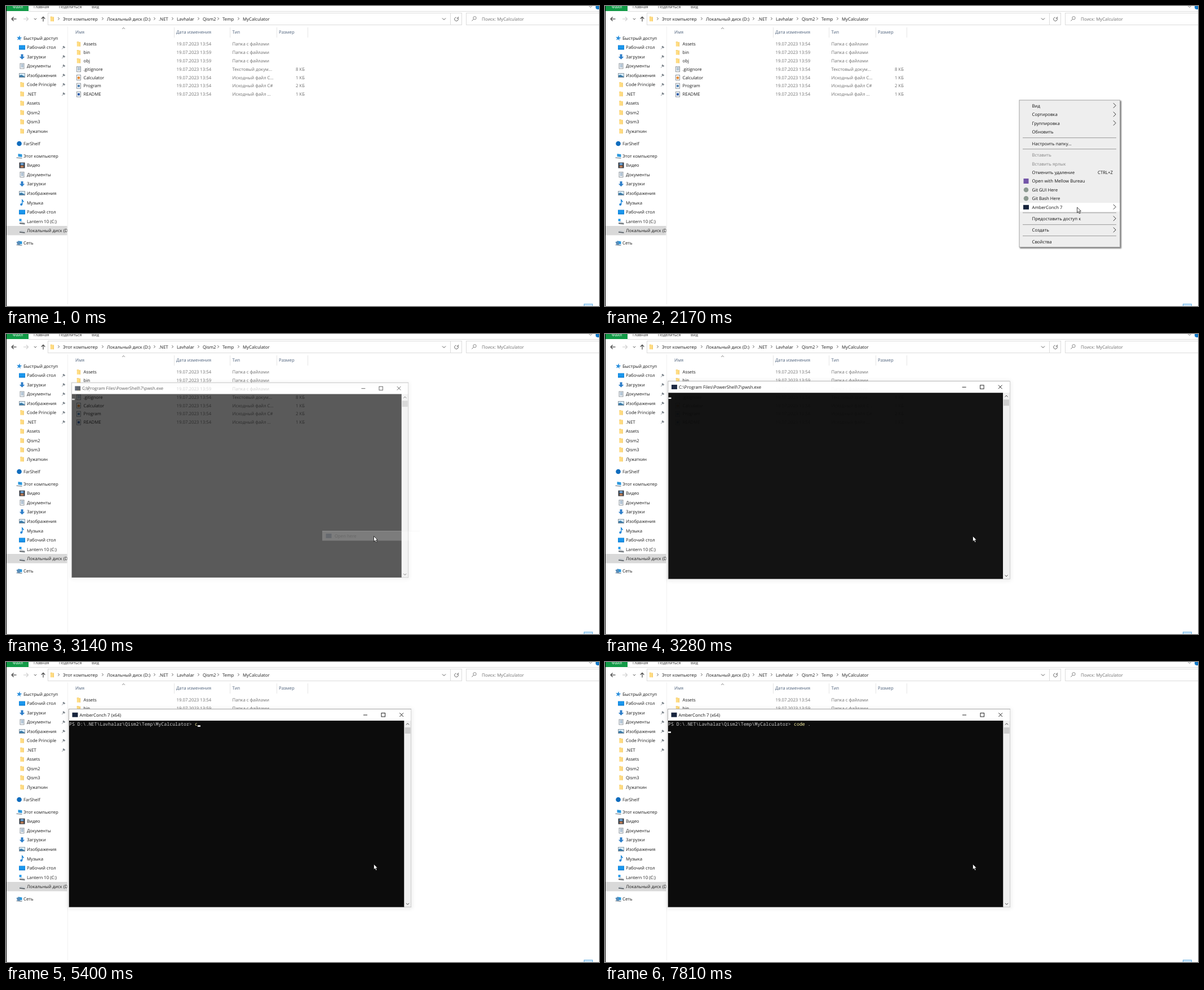
Animation of 1052 by 532 pixels, one loop 8 s. Source, as an HTML page with a canvas:

```html
<!DOCTYPE html>
<html lang="ru">
<head>
<meta charset="utf-8">
<style>
html, body { margin: 0; height: 100%; overflow: hidden; background: #fff; }
canvas { display: block; }
</style>
</head>
<body>
<canvas id="stage" width="1052" height="532"></canvas>
<script>
const g = document.getElementById('stage').getContext('2d');
const LOOP = 8000, CELL = 4.955;
const UI = '"Open Sans", "Noto Sans", sans-serif', MONO = '"Noto Sans Mono", monospace';
const APP = 'AmberConch 7';
g.textRendering = 'geometricPrecision';

const rect = (x, y, w, h, c) => { g.fillStyle = c; g.fillRect(x, y, w, h); };
const frame = (x, y, w, h, c) => { g.strokeStyle = c; g.lineWidth = 1; g.strokeRect(x, y, w, h); };
const dot = (x, y, r, c) => { g.fillStyle = c; g.beginPath(); g.arc(x, y, r, 0, 7); g.fill(); };
function trace(p) {
  g.beginPath();
  for (let i = 0; i < p.length; i += 2) g.lineTo(p[i], p[i + 1]);
}
const poly = (c, ...p) => { trace(p); g.fillStyle = c; g.fill(); };
const line = (c, w, ...p) => { trace(p); g.strokeStyle = c; g.lineWidth = w; g.stroke(); };
function text(s, x, y, c = '#1a1a1a', size = 7.8, font = UI, align = 'left') {
  g.font = size + 'px ' + font;
  g.textAlign = align;
  g.fillStyle = c;
  g.fillText(s, x, y);
}
const right = (x, y, s, c = '#555') => line(c, 1, x - s / 2, y - s, x + s / 2, y, x - s / 2, y + s);
const down = (x, y, s, c = '#555') => line(c, 1, x - s, y - s / 2, x, y + s / 2, x + s, y - s / 2);
const up = (x, y, s, c = '#555') => down(x, y, -s, c);

// Small icons, drawn around their centre
function sheet(x, y) { rect(x - 4, y - 5, 8, 10, '#fff'); frame(x - 3.5, y - 4.5, 7, 9, '#8c959d'); }
const icons = {
  folder(x, y) {
    rect(x - 3.2, y - 4.3, 3.5, 2, '#f0c45a');
    rect(x - 3.2, y - 3.6, 6.2, 7.8, '#ffdc83');
    rect(x + 2, y - 3.6, 1, 7.8, '#f2c661');
  },
  star(x, y) {
    const p = [];
    for (let i = 0; i < 10; i++) {
      const r = i % 2 ? 2 : 5, a = i * Math.PI / 5 - 1.4;
      p.push(x + r * Math.cos(a), y + r * Math.sin(a));
    }
    poly('#2b8fdc', ...p);
  },
  screen(x, y) { rect(x - 5.5, y - 4, 11, 8, '#0c7fd6'); rect(x - 4.8, y - 3.3, 9.6, 5.5, '#1a97ee'); },
  load(x, y) { poly('#2f7fc9', x - 2, y - 4.5, x + 2, y - 4.5, x + 2, y, x + 4.7, y, x, y + 4.7, x - 4.7, y, x - 2, y); },
  doc(x, y) {
    sheet(x, y);
    for (let i = -2; i < 4; i += 2) line('#6b8eae', 1, x - 2, y + i - .5, x + 2.5, y + i - .5);
  },
  picture(x, y) {
    rect(x - 5.5, y - 4, 11, 8, '#8f9ba5');
    rect(x - 4.5, y - 3, 9, 6, '#d7ecfa');
    poly('#3b7ba8', x - 4.5, y + 3, x - 4.5, y, x - 1, y - 1, x + 4.5, y + 2, x + 4.5, y + 3);
  },
  pc(x, y) {
    poly('#2b97dc', x - 2, y - 4, x + 5, y - 3, x + 5, y + 2, x - 2, y + 1);
    line('#8c98a2', 1.4, x - 5, y + 3, x + 5, y + 4);
  },
  film(x, y) { rect(x - 5, y - 5, 10, 10, '#343a43'); rect(x - 2.8, y - 4, 5.6, 3.5, '#6fa6d8'); rect(x - 2.8, y + .5, 5.6, 3.5, '#b77b55'); },
  music(x, y) { dot(x - 1.3, y + 3, 2, '#1683d8'); line('#1683d8', 1.4, x + .2, y + 3, x + .2, y - 5, x + 3, y - 1.5); },
  drive(x, y) { poly('#c9cdd1', x - 5, y + 1, x - 2, y - 1, x + 5, y + 1, x + 5, y + 3, x - 3, y + 3); line('#4c5359', 1.3, x - 4.5, y + 2.5, x + 5, y + 3.5); },
  system(x, y) { icons.drive(x, y + 1); rect(x - 5, y - 4.5, 4, 4, '#1a97ee'); },
  net(x, y) { icons.pc(x, y); poly('#5a8db8', x - 5, y - 2, x, y - 4, x + 2, y + 3, x - 3, y + 3); },
  cloud(x, y) { dot(x, y, 4.3, '#0f6cbd'); },
  feed(x, y) { sheet(x, y); dot(x, y + .5, 2.4, '#e58a35'); },
  code(x, y) { sheet(x, y); rect(x - 2, y - 2, 4, 4, '#4a7fb5'); },
  note(x, y) { sheet(x, y); rect(x - 2, y - 2, 4, 4, '#2457a6'); },
  shell(x, y) { rect(x - 5, y - 4, 10, 8, '#17243d'); },
  studio(x, y) { rect(x - 4.5, y - 4.5, 9, 9, '#7455a8'); },
  git(x, y) { dot(x, y, 4.3, '#8c9a91'); }
};

const crumbs = [['Этот компьютер', 101], ['Локальный диск (D:)', 179], ['.NET', 271], ['Lavhalar', 303],
  ['Qism2', 349], ['Temp', 384], ['MyCalculator', 420]];
// icon, label, row centre, top level
const side = [['star', 'Быстрый доступ', 57, 1], ['screen', 'Рабочий стол', 73.5], ['load', 'Загрузки', 90],
  ['doc', 'Документы', 106.5], ['picture', 'Изображения', 123], ['folder', 'Code Principle', 139.5],
  ['folder', '.NET', 156], ['folder', 'Assets', 172.5], ['folder', 'Qism2', 189], ['folder', 'Qism3', 205.5],
  ['folder', 'Лужаткин', 222], ['cloud', 'FarShelf', 244, 1], ['pc', 'Этот компьютер', 266, 1],
  ['film', 'Видео', 282.5], ['doc', 'Документы', 299], ['load', 'Загрузки', 315.5], ['picture', 'Изображения', 332],
  ['music', 'Музыка', 349], ['screen', 'Рабочий стол', 365.5], ['system', 'Lantern 10 (C:)', 382],
  ['drive', 'Локальный диск (D:)', 398.5], ['net', 'Сеть', 420.5, 1]];
const files = [['folder', 'Assets', '54', 'Папка с файлами'], ['folder', 'bin', '59', 'Папка с файлами'],
  ['folder', 'obj', '59', 'Папка с файлами'], ['doc', '.gitignore', '54', 'Текстовый докум...', '8 КБ'],
  ['feed', 'Calculator', '54', 'Исходный файл С...', '1 КБ'], ['code', 'Program', '54', 'Исходный файл C#', '2 КБ'],
  ['note', 'README', '54', 'Исходный файл ...', '1 КБ']];
// label, row centre, extra: '>' submenu, '-' disabled, icon name or shortcut
const menu = [['Вид', 177, '>'], ['Сортировка', 192.5, '>'], ['Группировка', 208, '>'], ['Обновить', 223.5],
  ['Настроить папку...', 244], ['Вставить', 264.5, '-'], ['Вставить ярлык', 280, '-'],
  ['Отменить удаление', 295, 'CTRL+Z'], ['Open with Mellow Bureau', 310.5, 'studio'], ['Git GUI Here', 326, 'git'],
  ['Git Bash Here', 341.3, 'git'], [APP, 356.8, 'shell'], ['Предоставить доступ к', 377.3, '>'],
  ['Создать', 397.5, '>'], ['Свойства', 418]];

function drawExplorer() {
  rect(0, 0, 1052, 532, '#fff');
  rect(1, 0, 39, 9, '#129a47');
  text('Файл', 12, 4, '#fff', 7);
  text('Главная', 49, 4, '#333', 7);
  text('Поделиться', 94, 4, '#333', 7);
  text('Вид', 152, 4, '#333', 7);
  rect(40, 9, 1012, 1, '#dcdcdc');
  down(1037, 1, 3, '#777');
  dot(1050, 2, 4, '#1079c9');

  line('#333', 1.1, 18.5, 23, 10, 23); line('#333', 1.1, 13.5, 19.5, 10, 23, 13.5, 26.5);
  line('#ccc', 1.1, 31, 23, 39.5, 23); line('#ccc', 1.1, 36, 19.5, 39.5, 23, 36, 26.5);
  down(52, 23, 2.2);
  line('#333', 1.1, 66, 27.5, 66, 19.5); line('#333', 1.1, 62.7, 22.7, 66, 19.3, 69.3, 22.7);
  frame(74.5, 12.5, 734, 21, '#dcdcdc');
  rect(788, 13, 1, 20, '#dcdcdc');
  frame(816.5, 12.5, 240, 21, '#dcdcdc');
  icons.folder(82, 23);
  for (const [s, x] of crumbs) { right(x - 7.5, 22.5, 2.2); text(s, x, 25.7); }
  down(777, 23, 3);
  g.beginPath(); g.arc(799, 23.3, 3.3, -.6, 4.6); g.strokeStyle = '#555'; g.lineWidth = .9; g.stroke();
  line('#555', .9, 802.2, 19, 802.2, 21.6, 799.6, 21.6);
  g.beginPath(); g.arc(831.5, 21.3, 2.7, 0, 7); g.strokeStyle = '#777'; g.stroke();
  line('#777', 1, 829.5, 23.3, 826.5, 26.5);
  text('Поиск: MyCalculator', 844, 25.7, '#6d6d6d');

  const head = '#4c607a';
  text('Имя', 123, 49.3, head); text('Дата изменения', 302, 49.3, head);
  text('Тип', 401.5, 49.3, head); text('Размер', 484, 49.3, head);
  for (const x of [298, 397, 480, 535]) rect(x, 38, 1, 18, '#e6e6e6');
  up(208.5, 39.5, 2.3, '#777');
  files.forEach(([icon, name, min, kind, size], i) => {
    const y = 67.5 + i * 14.85, b = y + 2.7;
    icons[icon](129, y);
    text(name, 137.5, b);
    text('19.07.2023 13:' + min, 302.5, b, '#6d6d6d');
    text(kind, 401.5, b, '#6d6d6d');
    if (size) text(size, 530, b, '#6d6d6d', 7.8, UI, 'right');
  });

  rect(109, 36, 1, 493, '#f1f1f1');
  rect(1, 390, 107.5, 16.5, '#d9d9d9');
  g.save();
  g.beginPath(); g.rect(0, 36, 108.5, 496); g.clip();
  side.forEach(([icon, name, y, top], i) => {
    icons[icon](top ? 23.5 : 28.5, y);
    text(name, top ? 31 : 37, y + 2.8);
    if (i && i < 7) {
      poly('#7d858c', 102, y - 3, 105.3, y, 103, y + 1.5, 100.3, y - 1);
      line('#7d858c', .9, 101.8, y, 99.3, y + 3);
    }
  });
  g.restore();
  rect(0, 0, 1, 532, '#000');
  rect(1025, 528, 16, 4, '#cce8ff');
  frame(1025.5, 528.5, 15, 6, '#6cb3e4');
}

// Pointer way points: time, x, y
const way = [[130, 974, 508], [300, 900, 400], [450, 790, 240], [600, 727, 158], [680, 734, 166], [740, 736, 172],
  [910, 778, 242], [1160, 841.5, 355], [1300, 850, 385], [1500, 848, 394], [1640, 848, 394], [1970, 838, 357],
  [2170, 838, 357], [2400, 755, 357], [2720, 652.5, 358.5]];
function pointer(t) {
  const i = way.findIndex(p => p[0] > t);
  if (i < 1) return (i ? way[way.length - 1] : way[0]).slice(1);
  const [a, x, y] = way[i - 1], [b, u, v] = way[i], k = (t - a) / (b - a);
  return [x + (u - x) * k, y + (v - y) * k];
}
function drawPointer(x, y) {
  const p = [0, 0, 0, 9.5, 2.2, 7.5, 3.8, 11, 5.5, 10.2, 4, 6.8, 6.8, 6.8].map((v, i) => v + (i % 2 ? y : x));
  trace(p); g.closePath();
  g.fillStyle = '#fff'; g.fill();
  g.strokeStyle = '#111'; g.lineWidth = .8; g.stroke();
}

const clamp = v => Math.max(0, Math.min(1, v));
function panel(x, y, w, h) {
  g.save();
  g.shadowColor = 'rgba(0,0,0,.5)'; g.shadowBlur = 2; g.shadowOffsetX = g.shadowOffsetY = 1.5;
  rect(x, y, w, h, '#eee');
  g.restore();
  frame(x + .5, y + .5, w - 1, h - 1, '#a5a5a5');
}
function openHere(back) {
  if (back) {
    rect(561, 349, 173, 17.5, '#fff');
    rect(561, 349, 173, 1, '#dadada');
  }
  icons.shell(572.5, 358);
  text('Open here', 583, 361);
}
function drawMenu(t) {
  const [px, py] = pointer(t - 40);
  g.globalAlpha = clamp((t - 690) / 190);
  panel(734.5, 166.5, 179.5, 261.5);
  for (const y of [233, 253, 366, 387, 407]) rect(741, y + .2, 166, 1, '#999');
  for (const [s, y, extra] of menu) {
    if (t > 780 && Math.abs(py - y) < 7.8) rect(736, y - 7.8, 177, 15.5, '#fff');
    text(s, 757.5, y + 2.8, extra == '-' ? '#838383' : '#111');
    if (icons[extra]) icons[extra](747, y);
    if (extra == '>' || extra == 'shell') right(904, y - .5, 4.3, '#333');
    if (extra == 'CTRL+Z') text(extra, 901, y + 2.8, '#111', 7.8, UI, 'right');
  }
  if (t > 2240) {
    g.globalAlpha = clamp((t - 2240) / 190);
    panel(559, 347, 176, 21);
    openHere(px < 734);
  }
  g.globalAlpha = 1;
}

const prompt = 'PS D:\\.NET\\Lavhalar\\Qism2\\Temp\\MyCalculator> ';
// time, typed text, suggestion, caret: 0 hidden, 1 after the text, 2 on the next line
const typing = [[3610, '', '', 1], [4410, 'с', '', 1], [4540, 'сщ', '', 1], [4610, 'сщв', '', 1], [4810, 'сщву', '', 1],
  [5070, 'сщву', '', 0], [5200, 'сщв', '', 1], [5330, 'сщ', '', 1], [5400, 'с', '', 1], [5660, 'с', '', 0],
  [6010, '', '', 1], [6210, '', '', 0], [6540, 'c', 'ode .', 1], [6750, 'co', 'de .', 1], [6880, 'cod', 'e .', 1],
  [7010, 'code', ' .', 1], [7280, 'code ', '.', 1], [7500, 'code .', '', 1], [7810, 'code .', '', 2]];
function drawConsole(t) {
  const k = t < 3350 ? Math.exp((3072 - t) / 61) : 0, s = 1 - .05 * k;
  g.save();
  g.globalAlpha = 1 - k;
  g.translate(415.3, 259); g.scale(s, s); g.translate(-415.3, -259);
  g.save();
  g.shadowColor = 'rgba(0,0,0,.4)'; g.shadowBlur = 7; g.shadowOffsetY = 1;
  frame(111.5, 83.5, 607, 351, '#aaa');
  g.restore();
  rect(112, 84, 606.5, 20, '#fff');
  rect(112, 104, 594.5, 330.5, '#0c0c0c');
  rect(706.5, 104, 12, 330.5, '#f0f0f0');
  rect(707.5, 116, 10, 11, '#cdcdcd');
  up(712.5, 110, 2.5, '#444');
  down(712.5, 429, 2.5, '#444');
  icons.shell(122.5, 93.7);
  text(t < 3540 ? 'C:\\Program Files\\PowerShell\\7\\pwsh.exe' : APP + ' (x64)', 130.5, 96.6, '#111');
  line('#222', 1, 634, 94, 641, 94);
  frame(666, 90.5, 6.5, 6.5, '#222');
  line('#222', 1, 698.3, 90.3, 705, 97); line('#222', 1, 705, 90.3, 698.3, 97);

  const state = typing.filter(e => e[0] <= t).pop();
  let cx = 112, cy = 112.3, caret = 1;
  if (state) {
    const [, typed, hint, shown] = state, x = 112 + prompt.length * CELL;
    const put = (str, at, c) => text(str, x + at * CELL, 113, c, 8.26, MONO);
    text(prompt, 112, 113, '#ccc', 8.26, MONO);
    put(typed.slice(0, 4), 0, '#f9f1a5');
    put(typed.slice(4), 4, '#ddd');
    put(hint, typed.length, '#767676');
    caret = shown;
    if (shown == 2) cy += 11;
    else cx = x + typed.length * CELL;
  }
  if (caret) rect(cx, cy, 5, 2.5, '#fff');
  g.restore();
}

function draw(t) {
  drawExplorer();
  if (t > 690 && t < 2880) drawMenu(t);
  if (t > 3072) drawConsole(t);
  if (t >= 2880 && t < 3210) {
    g.globalAlpha = clamp((3210 - t) / 330);
    openHere(true);
    g.globalAlpha = 1;
  }
  if (t >= 130) drawPointer(...pointer(t));
}
function tick(now) {
  draw(now % LOOP);
  requestAnimationFrame(tick);
}
requestAnimationFrame(tick);
</script>
</body>
</html>
```
